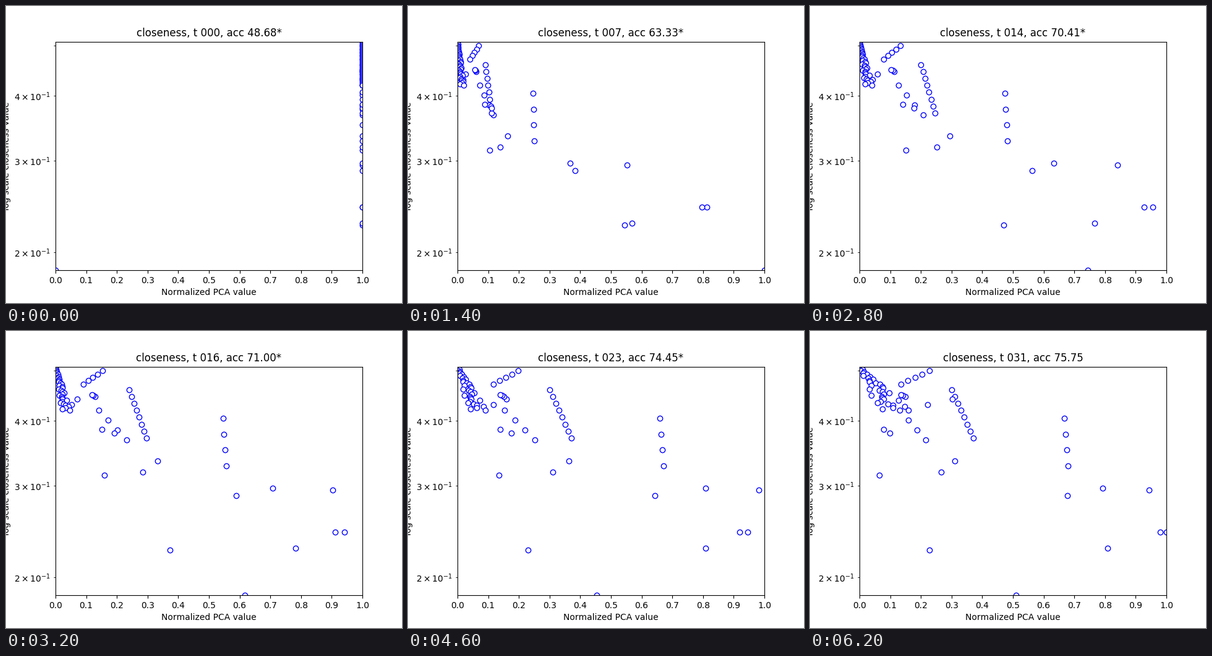
Animation, 640 px wide and 480 px high, one loop 6.4 s. Source, as a matplotlib script:

```python
import numpy as np
import matplotlib.pyplot as plt
from matplotlib.animation import FuncAnimation

FRAMES, INTERVAL = 32, 200
LOW, HIGH = 0.1845, 0.5092
KEY_STEPS = [4, 10, 19, 31]
ACC_STEPS = [0, 4, 10, 14, 19, 27, 31]
ACC_VALUES = [48.68, 61.02, 65.64, 70.41, 71.89, 77.02, 75.75]

# Outliers: closeness and the PCA value at each key step.
OUTLIERS = [
    (LOW, [1, 1, 0.425, 0.51]),
    (0.2256, [0.43, 0.66, 0.23, 0.228]),
    (0.2274, [0.406, 0.732, 0.808, 0.808]),
    (0.2443, [0.64, 0.986, 0.918, 1]),
    (0.2443, [0.635, 0.958, 0.889, 0.98]),
    (0.2873, [0.258, 0.51, 0.627, 0.677]),
    (0.2945, [0.392, 0.712, 1, 0.943]),
    (0.2969, [0.248, 0.486, 0.817, 0.792]),
]

# Bands: count, closeness from/to, reach from/to, early share, final share.
BANDS = [
    (1, 0.3145, 0.3145, 0.169, 0.169, 0.82, 0.38),
    (2, 0.3189, 0.3350, 0.333, 0.389, 0.56, 0.80),
    (4, 0.3278, 0.4050, 0.667, 0.655, 0.50, 1.02),
    (4, 0.3678, 0.4197, 0.270, 0.165, 0.58, 0.80),
    (8, 0.3710, 0.4596, 0.370, 0.300, 0.40, 1.00),
    (2, 0.3791, 0.3854, 0.212, 0.169, 0.70, 0.47),
    (2, 0.4300, 0.4410, 0.065, 0.089, 0.38, 3.40),
    (3, 0.4459, 0.4496, 0.153, 0.140, 0.53, 0.97),
    (5, 0.5003, 0.4710, 0.183, 0.109, 0.50, 1.24),
]
CROWD = 36


def growth(reach, early, final):
    """PCA values at the key steps, rising to reach and then drifting."""
    return np.outer(reach, [early / 2, early, 1, final])


def build_nodes():
    closeness = [[c for c, _ in OUTLIERS]]
    paths = [[path for _, path in OUTLIERS]]
    for count, c0, c1, r0, r1, early, final in BANDS:
        closeness.append(np.geomspace(c0, c1, count))
        paths.append(growth(np.linspace(r0, r1, count), early, final))

    # The crowd fans out further the lower its closeness.
    rng = np.random.default_rng(4)
    crowd = np.geomspace(HIGH, 0.42, CROWD)
    end = 0.73 * np.log(HIGH / crowd) * rng.uniform(0.3, 1.2, CROWD)
    closeness.append(crowd)
    paths.append(growth(end / 2.8, 0.45, 2.8))
    return np.concatenate(closeness), np.vstack(paths)


CLOSENESS, PATHS = build_nodes()


def positions(step):
    if step == 0:
        return np.where(CLOSENESS <= LOW, 0.0, 1.0)
    x = np.array([np.interp(step, KEY_STEPS, path) for path in PATHS])
    return x ** (1 + 0.04 * max(0, KEY_STEPS[0] - step))


def accuracy(step):
    return np.interp(step, ACC_STEPS, ACC_VALUES)


def title_text(step):
    best = max(accuracy(s) for s in range(step + 1))
    star = "*" if accuracy(step) >= best else ""
    return f"closeness, t {step:03d}, acc {accuracy(step):.2f}{star}"


plt.rcParams["text.kerning_factor"] = 6
fig, ax = plt.subplots(figsize=(6.4, 4.8), dpi=100)
ax.set_yscale("log")
ax.set_xlim(0, 1)
ax.set_ylim(LOW, HIGH)
ax.set_xticks(np.linspace(0, 1, 11))
ax.set_xlabel("Normalized PCA value")
ax.set_ylabel("log scale closeness value")
title = ax.set_title(title_text(0))
nodes, = ax.plot(positions(0), CLOSENESS, "o", color="blue",
                 markerfacecolor="white")


def update(step):
    nodes.set_xdata(positions(step))
    title.set_text(title_text(step))
    return nodes, title


animation = FuncAnimation(fig, update, frames=FRAMES, interval=INTERVAL,
                          repeat=True, repeat_delay=0, blit=False)
plt.show()
```
